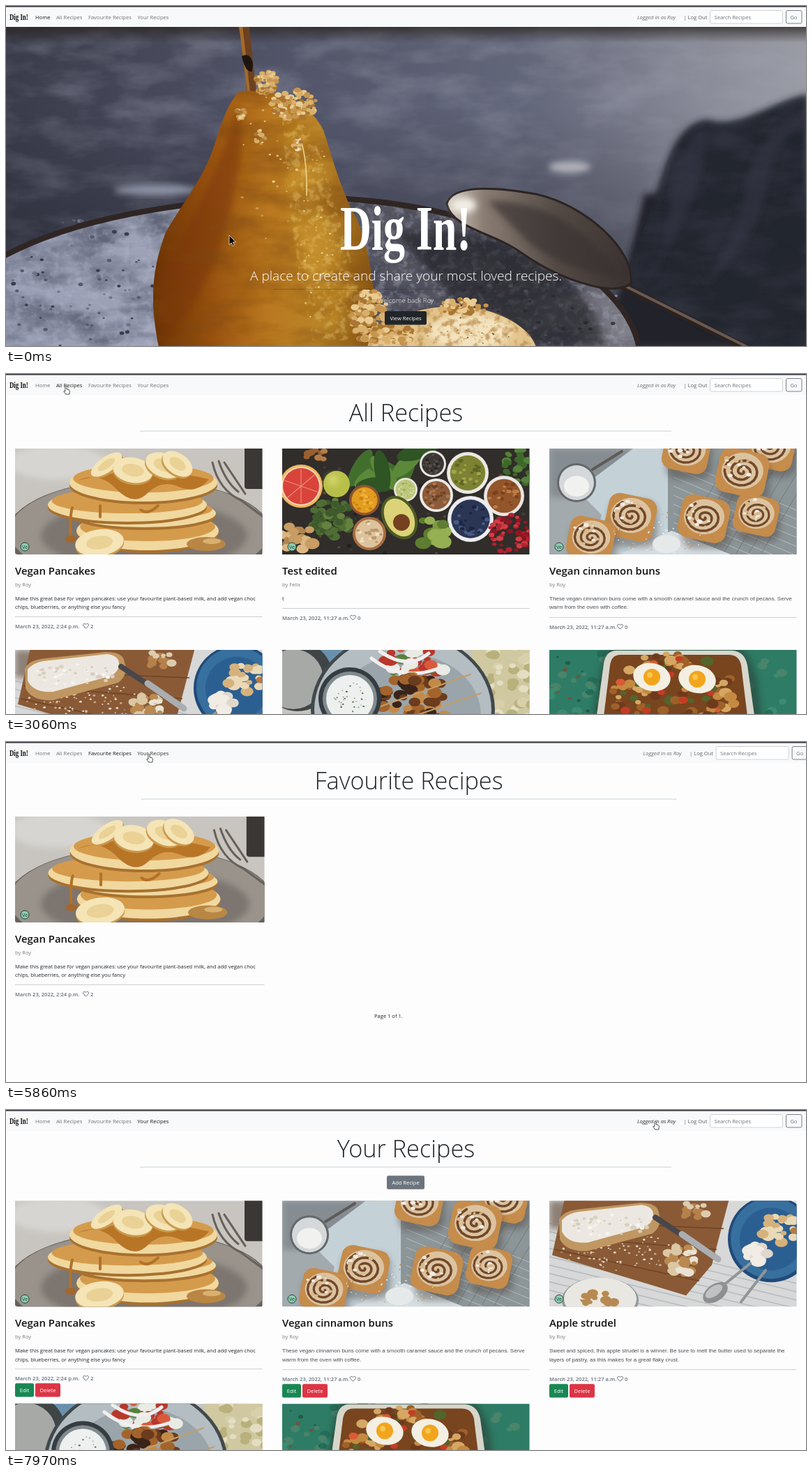
An HTML page that plays this animation: 1147 by 488 pixels, repeating every 8000 ms.

```html
<!DOCTYPE html>
<html lang="en">
<head>
<meta charset="utf-8">
<title>Recipe site tour</title>
<style>
html, body { margin: 0; width: 1147px; height: 488px; overflow: hidden; background: #fdfdfe; }
svg { position: absolute; left: 0; top: 0; overflow: hidden; }
text { font-family: "Open Sans", "Noto Sans", sans-serif; white-space: pre; }
.brand { font-family: "Liberation Serif", "Noto Serif", serif; font-weight: 700; }
.plain { font-family: "Liberation Sans", sans-serif; }
.light { font-weight: 300; }
.on { animation: 8s step-end infinite; opacity: 0; }
#home { animation-name: home; }
#all { animation-name: all; }
#fav { animation-name: fav; }
#own { animation-name: own; }
#overAll { animation-name: overAll; }
#overFav { animation-name: overFav; }
#overOwn { animation-name: overOwn; }
#overLog { animation-name: overLog; }
#arrow { animation-name: arrow; }
#hand { animation-name: hand; }
#cursor { width: 30px; height: 30px; overflow: visible; animation: move 8s infinite; }
@keyframes home { 0% { opacity: 1 } 38.25%, 100% { opacity: 0 } }
@keyframes all { 0% { opacity: 0 } 38.25% { opacity: 1 } 61%, 100% { opacity: 0 } }
@keyframes fav { 0% { opacity: 0 } 61% { opacity: 1 } 85%, 100% { opacity: 0 } }
@keyframes own { 0% { opacity: 0 } 85%, 100% { opacity: 1 } }
@keyframes overAll { 0%, 18% { opacity: 0 } 17.125%, 29.125% { opacity: 1 } 38.25%, 100% { opacity: 0 } }
@keyframes overFav { 0% { opacity: 0 } 51.875% { opacity: 1 } 59.375%, 100% { opacity: 0 } }
@keyframes overOwn { 0% { opacity: 0 } 73.25% { opacity: 1 } 84.125%, 100% { opacity: 0 } }
@keyframes overLog { 0% { opacity: 0 } 99.625%, 100% { opacity: 1 } }
@keyframes arrow {
  0%, 59.375%, 84.125%, 89.125% { opacity: 1 }
  16.25%, 61.875%, 85%, 98.75%, 100% { opacity: 0 }
}
@keyframes hand {
  0%, 59.375%, 84.125%, 89.125% { opacity: 0 }
  16.25%, 61.875%, 85%, 98.75%, 100% { opacity: 1 }
}
@keyframes move {
  0%, .75% { transform: translate(320px, 329px); animation-timing-function: steps(3) }
  3.375%, 6.625% { transform: translate(319px, 328px); animation-timing-function: steps(4) }
  10.125% { transform: translate(272px, 245px); animation-timing-function: steps(4) }
  13.625% { transform: translate(150px, 90px); animation-timing-function: steps(4) }
  17.125% { transform: translate(90px, 17px); animation-timing-function: steps(5) }
  21.625%, 24.025% { transform: translate(58px, 18px); animation-timing-function: steps(6) }
  29.125%, 46.475% { transform: translate(86px, 17px); animation-timing-function: steps(6) }
  51.875%, 52.75% { transform: translate(134px, 13px); animation-timing-function: steps(2) }
  56%, 66.84% { transform: translate(136px, 17px); animation-timing-function: steps(7) }
  73.25%, 75.775% { transform: translate(205px, 17px); animation-timing-function: steps(3) }
  78.7% { transform: translate(203px, 13px); animation-timing-function: steps(3) }
  81.625%, 88.25% { transform: translate(207px, 18px); animation-timing-function: steps(4) }
  91.75% { transform: translate(400px, 43px); animation-timing-function: steps(4) }
  95.25% { transform: translate(760px, 46px); animation-timing-function: steps(4) }
  98.75%, 100% { transform: translate(931px, 16px) }
}
</style>
</head>
<body>
<svg id="stage" width="1147" height="488" viewBox="0 0 1147 488"></svg>
<svg id="cursor" viewBox="0 0 30 30">
  <path id="arrow" class="on" d="M0 0V13.6L3.2 10.8 5.3 15.4 7.4 14.5 5.4 9.9H9.4Z" fill="#050505" stroke="#fff" stroke-width=".7"/>
  <path id="hand" class="on" d="M-1.1 1.2a1.1 1.1 0 0 1 2.2 0V5l3.2.8q1.3.5 1.1 2L4.8 12H-.3L-3.2 8q0-1.4 2.1-.2Z" fill="#fff" stroke="#222" stroke-width=".8"/>
</svg>
<script>
const T = (x, y, size, text, more = '') => `<text x="${x}" y="${y}" font-size="${size}" ${more}>${text}</text>`;
const E = (x, y, rx, ry, fill, more = '') => `<ellipse cx="${x}" cy="${y}" rx="${rx}" ry="${ry}" fill="${fill}" ${more}/>`;
const C = (x, y, r, fill, more) => E(x, y, r, r, fill, more);
const P = (d, fill, more = '') => `<path d="${d}" fill="${fill}" ${more}/>`;
const L = (d, color, width) => P(d, 'none', `stroke="${color}" stroke-width="${width}" stroke-linecap="round"`);
const R = (x, y, w, h, fill, more = '') => `<rect x="${x}" y="${y}" width="${w}" height="${h}" fill="${fill}" ${more}/>`;
const ring = (color, width) => `stroke="${color}" stroke-width="${width}"`;
const tilt = (deg, x, y) => `transform="rotate(${deg} ${x} ${y})"`;
const soft = 'filter="url(#blur)"';
const tex = (name, opacity) => `filter="url(#${name})" opacity="${opacity}"`;
const mid = 'text-anchor="middle"';

// Seeded blobs inside an ellipse
function scatter(n, seed, x, y, rx, ry, size, colors) {
  let s = seed * 1000003;
  const rnd = () => (s = s * 16807 % 2147483647) / 2147483647;
  let out = '';
  for (let i = 0; i < n; i++) {
    const a = rnd() * 6.283, d = Math.sqrt(rnd()), r = size * (.5 + rnd() * .7);
    out += E((x + Math.cos(a) * d * rx).toFixed(1), (y + Math.sin(a) * d * ry).toFixed(1),
      r.toFixed(1), (r * .75).toFixed(1), colors[Math.floor(rnd() * colors.length)]);
  }
  return out;
}

function gradient(id, stops, more = '') {
  const list = stops.map(([at, color, alpha = 1]) =>
    `<stop offset="${at}" stop-color="${color}" stop-opacity="${alpha}"/>`).join('');
  return `<linearGradient id="${id}" ${more}>${list}</linearGradient>`;
}

// Keeps the fill of a shape only where the noise is strong
const texture = (id, freq, gain, cut) =>
  `<filter id="${id}" x="0" y="0" width="100%" height="100%">
  <feTurbulence type="fractalNoise" baseFrequency="${freq}" numOctaves="4" seed="4"/>
  <feColorMatrix values="0 0 0 0 1  0 0 0 0 1  0 0 0 0 1  ${gain} 0 0 0 ${cut}" result="noise"/>
  <feComposite in="SourceGraphic" in2="noise" operator="in"/></filter>`;

const bowl = (x, y, r, rim, fill, bits) =>
  C(x, y, r, rim) + C(x, y, r * .84, fill) + scatter(26, x + r, x, y, r * .72, r * .72, r / 9, bits);

function bun(x, y, r) {
  let d = '';
  for (let a = 0; a < 17; a += .35) {
    const q = r * (.04 + a * .043);
    d += `${d ? 'L' : 'M'}${(x + Math.cos(a) * q).toFixed(1)} ${(y + Math.sin(a) * q * .85).toFixed(1)}`;
  }
  return R(x - r + 3, y - r * .8 + 6, r * 2, r * 1.9, '#4d4540', `rx="${r * .5}" opacity=".45" ${soft}`) +
    R(x - r, y - r * .85, r * 2, r * 1.8, '#c58c4b', `rx="${r * .45}" ${tilt(12, x, y)}`) +
    E(x, y - 1, r * .83, r * .72, '#dcc3a0') + L(d, '#71482a', r * .1) +
    scatter(14, x, x - r * .2, y - r * .2, r * .6, r * .5, r * .09, ['#f1ece6', '#d9b98c']);
}

const pancake = (x, y, rx, ry) =>
  E(x, y + 5, rx, ry, '#a8712f') + E(x, y + 1, rx, ry, '#f0d89f') + E(x, y - 5, rx * .95, ry * .75, '#d59b4c');
const banana = (x, y, rx, ry, deg) =>
  E(x, y + 3, rx, ry, '#c99a4c', tilt(deg, x, y)) + E(x, y, rx, ry, '#f4e4b6', tilt(deg, x, y)) +
  E(x, y, rx * .55, ry * .5, '#ead195', tilt(deg, x, y));

const photos = {
  pancakes: R(0, 0, 358, 152, '#c8c5c0') + E(60, 20, 70, 25, '#d7d5d1', soft) + R(329, -4, 30, 62, '#3b3735', 'rx="4"') +
    E(178, 122, 190, 78, '#67625d') + E(178, 119, 186, 74, '#99938c') + E(185, 125, 148, 48, '#7c756f', soft) +
    L('M283 20Q292 60 325 75L356 98M292 18Q302 48 320 62M300 20L330 65', '#686059', 3) +
    pancake(190, 117, 102, 28) + pancake(185, 92, 103, 20) + pancake(161, 80, 114, 24) + pancake(184, 48, 106, 27) +
    P('M90 46Q180 20 278 44Q260 66 235 55T190 64T145 58T90 46Z', '#b97526') +
    L('M82 85Q78 98 80 128M122 82V98M205 82Q190 96 180 88', '#b3722a', 4) +
    banana(131, 23, 26, 11, -35) + banana(169, 31, 29, 18, 10) + banana(213, 24, 27, 17, 22) + banana(233, 22, 24, 15, 35) +
    E(274, 137, 28, 10, '#b98643') + E(282, 133, 13, 4, '#d8b171') + E(80, 130, 8, 5, '#a5662a') + banana(121, 135, 35, 19, -8),

  greens: R(0, 0, 358, 152, '#302d2a') + scatter(60, 3, 178, 76, 178, 80, 3, ['#3f3b35', '#5a4b36', '#22201e']) +
    [0, 1, 2, 3, 4, 5, 6, 7, 8].map(i => E(112 + i * 11, 28 + i % 3 * 12, 30, 11, ['#426e2d', '#5c883a', '#2f5524'][i % 3], tilt(-60 + i * 28, 112 + i * 11, 28))).join('') +
    scatter(9, 8, 52, 9, 20, 8, 6, ['#9b602f', '#b67a45']) + scatter(40, 4, 342, 22, 24, 30, 6, ['#3e692b', '#55813a']) +
    C(27, 54, 31, '#efb55b') + C(27, 54, 28, '#f2d9b9') + C(27, 54, 26, '#d9443a') + L('M27 30V78M4 46L50 62M8 70L46 38', '#ee8a74', 1.2) +
    C(78, 51, 19, '#b7bf48') + C(73, 45, 8, '#d5d76f', soft) + scatter(65, 7, 72, 100, 30, 28, 7, ['#4f6d35', '#3f5b2c', '#64813f']) +
    scatter(18, 6, 20, 130, 26, 20, 9, ['#c89c63', '#b28550', '#dbb782']) +
    bowl(118, 74, 22, '#8d5431', '#e29d20', ['#efb33d', '#c98212']) + bowl(177, 59, 17, '#e7e4dc', '#bcc67b', ['#d6db9c', '#9eab55']) +
    bowl(125, 122, 24, '#a76c40', '#dcc39d', ['#efdfc2', '#bb976a']) + bowl(216, 22, 19, '#e8e6e2', '#3c3836', ['#575049', '#242120']) +
    bowl(221, 67, 24, '#eceae6', '#8c5b39', ['#aa7850', '#6c4025']) + bowl(266, 35, 30, '#eae8e2', '#7d8232', ['#9fa34b', '#5f6624']) +
    bowl(318, 68, 29, '#e8e6e3', '#93552a', ['#bc7c45', '#7b421f']) + bowl(270, 101, 33, '#ebecef', '#2b3654', ['#465a86', '#1d2540']) +
    E(168, 99, 24, 33, '#4e5a25', tilt(-28, 168, 99)) + E(168, 99, 20, 29, '#dcd277', tilt(-28, 168, 99)) + C(171, 106, 12, '#74401f') +
    scatter(14, 5, 213, 117, 26, 24, 11, ['#7d9a3e', '#95b052', '#5d7d30']) +
    scatter(60, 9, 326, 122, 30, 28, 5, ['#b4212e', '#d13d42', '#8d1623']),

  buns: R(0, 0, 358, 152, '#a3aaae') + R(0, 0, 120, 70, '#858d92', soft) + P('M40 60L120 0H210L190 152H60L75 95Z', '#c4d2d8') +
    R(170, 0, 190, 152, '#8c9598') + P('M178 15' + 'l180 75m-180-62'.repeat(9), 'none', ring('#b4bbbd', 1)) +
    P('M178 150' + 'l90-150m-72 150'.repeat(8), 'none', ring('#6d7578', .8)) + P('M100 152L175 118L260 152Z', '#d5dde0') +
    L('M62 30L104 4', '#5e5b57', 4) + C(39, 49, 28, '#64686a') + C(39, 49, 25, '#d4d8da') + E(39, 54, 18, 15, '#f1f1ef') +
    bun(197, 2, 33) + bun(318, -3, 34) + bun(277, 33, 36) + bun(117, 97, 35) + bun(222, 99, 35) + bun(297, 94, 31) + bun(60, 128, 33) +
    scatter(60, 4, 160, 120, 70, 32, 1.2, ['#eef0f0', '#b98f60']) + E(168, 137, 20, 13, '#e6e9ea'),

  strudel: R(0, 0, 358, 152, '#d7d8d7') + P('M-10 30' + 'l370 90m-370-78'.repeat(10), 'none', ring('#b4bcc4', 1.5)) +
    R(0, 0, 60, 40, '#8d8076', soft) + P('M22 -3H258L233 92 196 136 4 78Z', '#8a5a36') + P('M12 52L240 70M16 30L250 40M8 70L215 115', 'none', ring('#6f4325', 1.5)) +
    scatter(90, 12, 105, 72, 95, 28, 1.7, ['#e2d8cc', '#c8ab8d']) + P('M14 27Q20 14 45 12L130 3Q156 3 157 18 163 35 148 47L55 72Q24 74 15 55Z', '#c09762') +
    P('M18 28Q28 16 50 15L132 6Q150 8 149 22 148 33 135 38L55 60Q26 62 18 44Z', '#ece8e1') + scatter(45, 9, 85, 35, 58, 15, 3, ['#f7f5f0', '#d8cfc0']) +
    L('M152 24L188 48', '#49474b', 8) + L('M190 48L242 84', '#aaaeb1', 9) + scatter(36, 5, 188, 83, 22, 25, 7, ['#e9e2d5', '#b98950', '#dbc7a4']) +
    scatter(16, 6, 205, 15, 22, 12, 6, ['#dcccae', '#b5814a']) + C(318, 55, 62, '#214a79') + C(318, 54, 58, '#376f9f') + C(318, 55, 45, '#2c5f91') +
    scatter(22, 7, 330, 40, 27, 21, 8, ['#d5b27d', '#ead9b7', '#b37d46']) + scatter(12, 8, 298, 75, 15, 13, 10, ['#f1ece4', '#e0d7cb']) +
    E(73, 143, 55, 33, '#92979b') + E(73, 141, 52, 31, '#e9e7e2') + scatter(20, 9, 70, 143, 24, 14, 7, ['#f3ead6', '#b78a52']) +
    E(238, 132, 20, 12, '#8e8f91', tilt(-35, 238, 132)) + E(236, 130, 14, 7, '#c0c1c2', tilt(-35, 236, 130)) + L('M250 121L288 90M275 145L310 100', '#929598', 4),

  skewers: R(0, 0, 358, 152, '#c4c5bf') + R(55, 0, 75, 60, '#6991ad') + C(22, 38, 50, '#3f4446') + C(16, 42, 43, '#a6a9a6') +
    R(272, 0, 90, 152, '#cfc8a0') + scatter(50, 11, 326, 50, 40, 70, 8, ['#e3ddc2', '#b9b17c', '#d8d0ab']) +
    E(173, 86, 132, 112, '#42494c') + E(173, 86, 127, 108, '#b4bdc1') + E(180, 94, 105, 88, '#9aa5ab') +
    scatter(26, 12, 190, 18, 47, 22, 9, ['#b9372b', '#e9ebe4', '#58823c', '#d85a3c']) + L('M140 2Q180 30 210 5M128 12Q170 45 220 28', '#f0eeee', 5) +
    scatter(75, 14, 190, 72, 55, 36, 9, ['#6b3c1d', '#a3642c', '#3a241a', '#c38a47']) + L('M130 85L270 35M145 110L285 62', '#c29c6a', 2) +
    C(97, 70, 45, '#353d43') + C(97, 70, 39, '#818b8e') + C(97, 70, 34, '#edf0ef') + scatter(35, 16, 97, 68, 26, 22, 1.3, ['#526a44', '#a8b4ac']),

  eggs: R(0, 0, 358, 152, '#2e7c65') + scatter(130, 17, 178, 75, 185, 85, 7, ['#3a8b72', '#256e59', '#4a846a']) + scatter(18, 18, 30, 65, 30, 70, 3, ['#75513a', '#245b4b']) +
    P('M82 -4H270Q288 0 298 45L312 152H55L70 45Z', '#2a3f38', `opacity=".6" ${soft}`) + P('M96 1H262Q280 2 284 22L302 152H60L78 20Q81 1 96 1Z', '#d8d6cb') +
    P('M102 7H257Q272 7 275 22L291 152H71L87 22Q89 7 102 7Z', '#78451f') +
    scatter(170, 19, 180, 80, 93, 78, 8, ['#a0602a', '#c58a42', '#6d3b1c', '#d5a763', '#53642c']) +
    scatter(14, 21, 170, 60, 85, 52, 6, ['#c53c24', '#dc5a35']) +
    [[147, 39], [212, 42]].map(([x, y]) => E(x, y, 27, 20, '#f3efe2', tilt(12, x, y)) + C(x, y, 12, '#f2a51c') + C(x - 3, y - 3, 4, '#f8c64e')).join('')
};

const brand = (x, y, size, color) =>
  `<g transform="translate(${x} ${y}) scale(.69 1)">${T(0, 0, size, 'Dig In!', `class="brand" fill="${color}"`)}</g>`;
const hr = (x, y, w) => R(x, y, w, 1, '#cdcfd1');
const button = (x, y, w, text, fill) =>
  R(x, y, w, 19.5, fill, 'rx="2.2"') + T(x + w / 2, y + 12.8, 7.55, text, `fill="#fff" ${mid}`);

const links = [[42, 'Home'], [72, 'All Recipes'], [118, 'Favourite Recipes'], [188.5, 'Your Recipes']];
const link = (i, alpha) => T(links[i][0], 18.8, 7.55, links[i][1], `fill="#000" fill-opacity="${alpha}"`);
const login = (dx, alpha) => T(905 + dx, 18.8, 7.55, 'Logged in as Roy', `font-style="italic" fill="#000" fill-opacity="${alpha}"`);

function nav(active, dx = 0) {
  return R(0, 0, 1147, 30, '#f8f9fa') + R(0, 0, 1147, 1.5, '#35343a') + brand(5, 19.8, 12.8, '#111') +
    links.map((_, i) => link(i, i === active ? .9 : .55)).join('') + login(dx, .55) +
    T(971.5 + dx, 18.8, 7.55, '| Log Out', 'fill="#000" fill-opacity=".6"') +
    R(1009.5 + dx, 6.5, 104, 18.5, '#fff', `rx="2" ${ring('#ced4da', 1)}`) + T(1015.5 + dx, 18.8, 7.55, 'Search Recipes', 'fill="#6c757d"') +
    R(1118.5 + dx, 6.5, 22.5, 18.5, 'none', `rx="2" ${ring('#7b838a', 1)}`) + T(1124.5 + dx, 18.8, 7.55, 'Go', 'fill="#6c757d"');
}

const photo = (id, x, y, w = 354.5) =>
  `<use href="#${id}" x="${x}" y="${y}" width="${w}" height="152"/>`;

const recipes = {
  pancakes: ['Vegan Pancakes', 'Roy', ['Make this great base for vegan pancakes: use your favourite plant-based milk, and add vegan choc', 'chips, blueberries, or anything else you fancy'], '2:24 p.m.', 2],
  greens: ['Test edited', 'Felix', ['t'], '11:27 a.m.', 0],
  buns: ['Vegan cinnamon buns', 'Roy', ['These vegan cinnamon buns come with a smooth caramel sauce and the crunch of pecans. Serve', 'warm from the oven with coffee.'], '11:27 a.m.', 0, 1],
  strudel: ['Apple strudel', 'Roy', ['Sweet and spiced, this apple strudel is a winner. Be sure to melt the butter used to separate the', 'layers of pastry, as this makes for a great flaky crust.'], '11:27 a.m.', 0, 1]
};

function card(id, x, y, w = 354.5, editable) {
  const [title, by, lines, time, likes, plain = 0] = recipes[id];
  const rule = y + 229 + (lines.length - 1) * 12 + plain, base = rule + 16.8;
  const style = plain ? 'class="plain" fill="#4a4d50"' : 'fill="#212529"';
  return photo(id, x, y, w) +
    C(x + 14, y + 141, 6, '#8fcbb3', ring('#24483c', 1)) + T(x + 14, y + 143.7, 7.2, 'Ve', `fill="#1d4a3a" ${mid}`) +
    T(x, y + 181, 14.9, title, 'font-weight="600" fill="#111"') + T(x, y + 197.8, 7.55, 'by ' + by, 'fill="#7b7f83"') +
    lines.map((s, i) => T(x, y + 218 + i * 12.3, plain ? 8 : 7.55, s, style)).join('') + hr(x, rule, w) +
    T(x, base, 7.6, 'March 23, 2022, ' + time, 'font-weight="600" fill="#656e76"') +
    P(`M${x + 101.5} ${base + .3}l-3.4-3.5c-2-2.4 1.3-4.8 3.4-2.2c2.1-2.6 5.4-.2 3.4 2.2z`, 'none', ring('#565e65', .9)) +
    T(x + 108, base, 7.6, likes, 'font-weight="600" fill="#656e76"') +
    (editable ? button(x, y + 262 + plain, 27, 'Edit', '#198754') + button(x + 29, y + 262 + plain, 36, 'Delete', '#dc3545') : '');
}

const heading = (x, text) => T(x, 67.5, 34.3, text, `class="light" fill="#212529" ${mid}`);
const plate = 'M-5 360C90 308 250 275 430 275C660 275 885 365 908 492H-5Z';
const pear = 'M333 124Q346 118 362 125C405 118 440 148 455 178C470 225 484 275 503 305C520 350 532 400 528 490H219C205 420 210 375 229 325C258 275 281 250 297 205C310 165 318 140 333 124Z';
const cloth = 'M1150 126C1090 140 1050 178 1005 163C958 170 948 225 930 275C915 330 885 370 897 402L1060 492H1150Z';
const ice = 'M518 490C525 455 585 432 640 431C700 430 752 460 760 490Z';
const crumbs = ['#d9b06c', '#c6954e', '#e9cb92', '#a97634'];

const hero = R(0, 30, 1147, 458, 'url(#wall)') + R(0, 30, 1147, 458, '#a9acbd', tex('mottle', .3)) +
  R(0, 30, 1147, 458, 'url(#shade)') + E(808, 231, 30, 8, '#b0b1ba', soft) + E(215, 264, 60, 7, '#8f94a6', soft) +
  P('M850 488L890 380 915 270H1147V488Z', '#23232b', soft) +
  P(plate, 'url(#dish)') + P(plate, '#2c2f42', tex('mottle', .5)) + P(plate, '#b9bdcd', tex('grain', .3)) +
  scatter(70, 23, 110, 400, 115, 95, 3, ['#555a70', '#6f748a', '#3a3c4c']) +
  scatter(45, 25, 770, 440, 115, 60, 3, ['#3b3a44', '#85879a']) + P(plate, 'none', ring('#2f2624', 8)) +
  P('M560 325C680 310 830 360 860 488H700Z', '#232025', `opacity=".6" ${soft}`) +
  P(cloth, '#24252e', soft) + P(cloth, '#3c3e4d', tex('mottle', .5)) +
  P('M1000 175Q960 200 950 300T915 390Q960 340 985 270T1000 175ZM1147 150Q1070 190 1060 260T1000 400Q1070 350 1090 260T1147 180Z', '#343644', `opacity=".6" ${soft}`) +
  L('M885 402L1060 490', '#2b2321', 10) + L('M888 402L1062 489', '#6a5a52', 4) +
  P('M632 284C640 255 705 260 760 270C830 285 902 350 896 398C870 420 790 390 740 355C700 325 640 320 632 284Z', 'url(#spoon)', ring('#2c2422', 3)) +
  P('M690 280Q770 278 830 330T880 390Q800 380 750 340Z', '#393230', `opacity=".65" ${soft}`) + E(656, 286, 18, 11, '#f2eee7', soft) +
  P('M332 28H349Q352 65 359 122L345 125Q343 65 332 28Z', '#6b4120') + P('M334 28L339 28Q344 70 350 124L346 124Z', '#a56a2c') + P('M338 72Q350 66 354 82L353 94Q343 96 338 72Z', '#1e1510') +
  P(pear, 'url(#pear)') + P('M330 150Q300 250 250 330T232 470Q290 420 320 300T330 150Z', '#7a3608', `opacity=".55" ${soft}`) +
  P('M420 165Q450 300 500 400L470 460Q400 350 395 190Z', '#cb962f', `opacity=".5" ${soft}`) + P(pear, '#7d470d', tex('mottle', .5)) +
  P('M395 150Q440 160 465 260L505 400 490 480H440Q405 330 395 150Z', '#eac873', tex('grain', .4)) +
  L('M422 190Q432 220 431 272', '#ecd28c', 1.6) +
  scatter(60, 31, 445, 330, 24, 130, 1.4, ['#d8ad58', '#ecd08c']) + scatter(24, 32, 375, 240, 42, 110, 2, crumbs) +
  scatter(70, 33, 373, 110, 16, 17, 4, crumbs) + scatter(110, 34, 412, 142, 33, 22, 4.5, crumbs) + scatter(20, 35, 337, 152, 7, 13, 3.5, crumbs) +
  scatter(20, 37, 365, 188, 8, 10, 3.5, crumbs) + scatter(20, 36, 418, 197, 6, 10, 3.5, ['#f3e3bd', ...crumbs]) +
  P(ice, '#e3c48c') + E(665, 468, 60, 26, '#f3e2bd', soft) + P(ice, '#b98d4c', tex('grain', .75)) +
  scatter(150, 38, 522, 446, 27, 38, 5.5, crumbs) + scatter(60, 41, 560, 470, 24, 15, 5, crumbs) + scatter(60, 39, 655, 432, 34, 11, 4.5, crumbs) +
  scatter(30, 40, 660, 466, 72, 20, 1.3, ['#7d5826', '#c39a58']);

const defs = gradient('wall', [[0, '#3b3d4c'], [.35, '#54576c'], [.65, '#666a7e'], [.9, '#9395a1'], [1, '#a0a2ab']]) +
  gradient('shade', [[0, '#29231f', .75], [.05, '#29231f', .05], [.25, '#22232e', .05], [1, '#22232e', .75]], 'x2="0" y2="1"') +
  gradient('dish', [[0, '#989eb4'], [.25, '#9da2b7'], [.55, '#5b5b67'], [.8, '#4c4b56'], [1, '#85858f']]) +
  gradient('spoon', [[0, '#d9d0c4'], [.2, '#8a7d73'], [.6, '#544a45'], [1, '#3a3230']]) +
  gradient('pear', [[0, '#6b3206'], [.25, '#96500f'], [.52, '#b97820'], [.75, '#b98428'], [1, '#8a5916']]) +
  texture('mottle', '.012 .03', 2.4, -.9) + texture('grain', '.09 .1', 4, -1.9) +
  `<filter id="blur" x="-40%" y="-40%" width="180%" height="180%"><feGaussianBlur stdDeviation="5"/></filter>` +
  Object.entries(photos).map(([id, art]) =>
    `<symbol id="${id}" viewBox="0 0 354.5 152" preserveAspectRatio="xMidYMid slice">${art}</symbol>`).join('');

const page = (id, body) => `<g id="${id}" class="on">${R(0, 0, 1147, 488, '#fdfdfe')}${body}</g>`;
const cols = [13, 396, 779];

document.getElementById('stage').innerHTML = `<defs>${defs}</defs>` +
  page('home', hero + nav(0) + brand(479, 350, 90, '#fff') +
    T(573.5, 394, 19.1, 'A place to create and share your most loved recipes.', `class="light" fill="#fff" ${mid}`) +
    R(383, 406, 382, 1, '#3a2a1c', 'opacity=".3"') + T(533, 426.3, 9.6, 'Welcome back Roy', 'class="light" fill="#fff"') +
    button(543, 438, 60, 'View Recipes', '#212529')) +
  page('all', nav(1) + heading(573.5, 'All Recipes') + hr(192, 81.5, 762) +
    ['pancakes', 'greens', 'buns'].map((id, i) => card(id, cols[i], 107)).join('') +
    ['strudel', 'skewers', 'eggs'].map((id, i) => photo(id, cols[i], 396)).join('')) +
  page('fav', nav(2, 8.6) + heading(577.5, 'Favourite Recipes') + hr(194, 81.5, 767.5) +
    card('pancakes', 13, 107, 357.5) + T(528, 396, 7.55, 'Page 1 of 1.', 'fill="#212529"')) +
  page('own', nav(3) + heading(573.5, 'Your Recipes') + hr(192, 81.5, 762) + button(546, 94.3, 54, 'Add Recipe', '#6c757d') +
    ['pancakes', 'buns', 'strudel'].map((id, i) => card(id, cols[i], 130.2, 354.5, true)).join('') +
    ['skewers', 'eggs'].map((id, i) => photo(id, cols[i], 421.5)).join('')) +
  ['All', 'Fav', 'Own'].map((name, i) => `<g id="over${name}" class="on">${link(i + 1, .35)}</g>`).join('') +
  `<g id="overLog" class="on">${login(0, .35)}</g>`;
</script>
</body>
</html>
```
